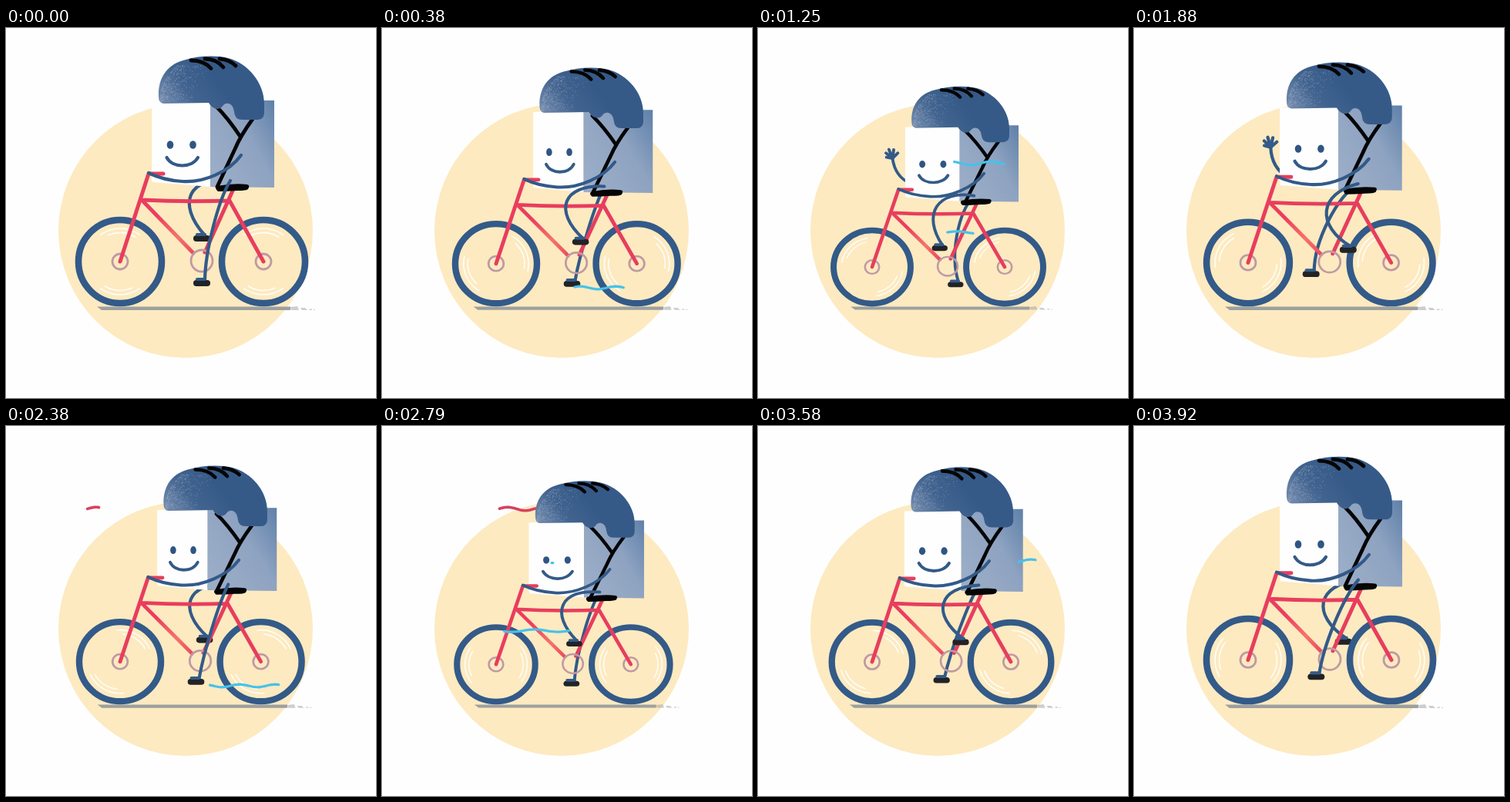
Write an HTML page that moves like this. It is 480x480 px and loops after 3.96 s.

```html
<!DOCTYPE html>
<html lang="en">
<head>
<meta charset="utf-8">
<title>Cycling cube</title>
<style>
  html, body { margin: 0; width: 100%; height: 100%; overflow: hidden; background: #fefefe; }
  svg { display: block; width: 100vw; height: 100vh; }
  .line { fill: none; stroke-linecap: round; stroke-linejoin: round; }
  .blue { stroke: #335a88; stroke-width: 4.2; }
  .red { stroke: #e83d5e; stroke-width: 5; }
  .black { stroke: #050506; stroke-width: 4.8; }
  .mauve { stroke: #bf9aa4; stroke-width: 2.8; }
  .glint { stroke: #fff; stroke-width: 1.6; opacity: .9; }
  .wind { stroke: #45c2ea; stroke-width: 3.2; }
</style>
</head>
<body>
<svg viewBox="0 0 480 480">
  <defs>
    <linearGradient id="side" x1="0" y1=".75" x2="1" y2="0">
      <stop offset="0" stop-color="#9badc7"/>
      <stop offset=".55" stop-color="#8ea3c1"/>
      <stop offset="1" stop-color="#5f80a9"/>
    </linearGradient>
    <linearGradient id="shell" x1="0" y1=".65" x2=".55" y2=".4">
      <stop offset="0" stop-color="#7189ac"/>
      <stop offset=".5" stop-color="#41638f"/>
      <stop offset="1" stop-color="#365a88"/>
    </linearGradient>
    <linearGradient id="tube" gradientUnits="userSpaceOnUse" x1="176" y1="223" x2="243" y2="292">
      <stop offset=".3" stop-color="#ec3d5f"/>
      <stop offset=".7" stop-color="#f5736a"/>
      <stop offset="1" stop-color="#ec4a60"/>
    </linearGradient>
    <g id="wheel">
      <circle r="54" class="line" stroke="#335a88" stroke-width="8.6"/>
      <circle r="10" class="line mauve"/>
    </g>
    <g id="foot">
      <rect x="-11" y="-4" width="22" height="8" rx="4" fill="#222326"/>
      <path class="line blue" d="M4-5H-6"/>
    </g>
    <path id="arc" class="line glint"/>
  </defs>

  <circle cx="233" cy="263" r="165" fill="#fdeac0"/>
  <path id="redWind" class="line" stroke="#d8415f" stroke-width="3.6"/>

  <g id="rig">
    <g fill="#9ca09f">
      <path d="M118 361.500H369V366H124Z"/>
      <path d="M369 362l9-1 2 5h-10zM382 363h6l3 3h-7zM393 364.500h4v1.500h-3zM399 365h2v1h-2z" opacity=".5"/>
    </g>
    <path id="farLeg" class="line blue"/>
    <use id="farFoot" href="#foot"/>
    <g id="wheels"></g>

    <g id="rider">
      <g id="wave">
        <path class="line blue" d="M4 6C-7-7-8-22-3-38"/>
        <path class="line blue" stroke-width="3.4" d="M-3-38L-10-43M-3-38L-8-49M-3-38L-2-52M-3-38L4-49M-3-38L7-42"/>
      </g>
      <path id="right" fill="url(#side)"/>
      <path id="front" fill="#fefefe"/>
      <g id="face">
        <g fill="#2f5583">
          <ellipse cx="213" cy="151.500" rx="4.300" ry="5.300"/>
          <ellipse cx="242.500" cy="151.500" rx="4.300" ry="5.300"/>
        </g>
        <path class="line blue" d="M208.500 168C216 182 241 182 249 168"/>
      </g>
      <path id="strap" class="line black" d="M273 102Q288 117 304 141M320 118Q304 140 297 157L274 206"/>
      <g id="helmet">
        <path fill="url(#shell)" d="M204 98Q198 97 198 89C197 66 208 48 230 42C249 36 271 35 288 39C315 46 335 72 335 98V111Q334 119 326 119H306Q297 119 296 109C295 98 287 95 282 100C278 107 269 107 263 97Z"/>
        <path id="grain" fill="#a9b9d0" opacity=".5"/>
        <path class="line black" stroke-width="4" d="M240 42Q257 42 266 52.500M258 40Q273 40 282 51M277 40Q290 41 298 49"/>
      </g>
    </g>

    <path class="line red" d="M204 189H185L148 303M176 223Q230 226 290 224L334 303M295 209L258 291"/>
    <path class="line" stroke="url(#tube)" stroke-width="5" d="M176 223L243 292"/>
    <circle cx="254" cy="302" r="14" class="line mauve"/>
    <path d="M274 205Q295 201 313 203Q317 204 314 209Q312 211 300 211Q286 212 275 212Q270 208 274 205Z" fill="#050506"/>
    <path class="line blue" d="M305 165C290 186 257 201 229 199C210 198 197 194 185 188"/>
    <path id="nearLeg" class="line blue"/>
    <use id="nearFoot" href="#foot"/>
  </g>
  <path id="windA" class="line wind"/>
  <path id="windB" class="line wind"/>
  <path id="windC" class="line wind"/>
</svg>
<script>
const $ = id => document.getElementById(id);
const put = (id, name, value) => $(id).setAttribute(name, value);
const clamp = v => Math.min(1, Math.max(0, v));
const smooth = v => { v = clamp(v); return v * v * (3 - 2 * v); };
const rad = deg => deg * Math.PI / 180;

const FPS = 24, LOOP = 3960;
const HIP = [291, 198], CRANK = [254, 302], LEG = 134.5;
const PEAKS = [1, .78, .33, .74];
// frame, glint angle in degrees
const SPIN = [[0, 90], [18, 315], [30, 495], [45, 692], [57, 960], [78, 1215], [94, 1435], [96, 1465]];

function arc(r, half, mid) {
  const p = a => `${(r * Math.cos(rad(a))).toFixed(2)} ${(r * Math.sin(rad(a))).toFixed(2)}`;
  return `M${p(mid - half)}A${r} ${r} 0 0 1 ${p(mid + half)}`;
}
put('arc', 'd', [0, 180].map(m => arc(43, 36, m) + arc(37.5, 28, m + 4)).join(''));
$('wheels').innerHTML = [148, 334].map(x =>
  `<g transform="translate(${x} 303)"><use href="#wheel"/><use class="spin" href="#arc"/></g>`).join('');
const spinners = document.querySelectorAll('.spin');

// Speckles thin out away from the helmet's left edge
let seed = 7;
const rnd = () => (seed = seed * 16807 % 2147483647) / 2147483647;
let dots = '';
for (let i = 0; i < 420; i++) {
  const y = 48 + rnd() * 47;
  const edge = 200 + Math.pow((95 - y) / 47, 2.4) * 22;
  dots += `M${(edge + rnd() * rnd() * 48).toFixed(1)} ${y.toFixed(1)}h.9v.9h-.9z`;
}
put('grain', 'd', dots);

// Height eases out of each squash; width settles sooner
function hop(f) {
  const up = f % 12 >= 6;
  const u = up ? (f % 12 - 6) / 6 : f % 12 / 6;
  const rise = power => up ? 1 - Math.pow(1 - u, power) : Math.pow(1 - u, 1.4);
  const beat = Math.floor((f + 6) / 12) % 4;
  return {
    tall: PEAKS[beat] * rise(2.3),
    wide: PEAKS[beat] * rise(5),
    turn: beat === 1 ? rise(5) : 0
  };
}

function spinAt(f) {
  const i = SPIN.findIndex(k => k[0] > f);
  const [a, x] = SPIN[i - 1], [b, y] = SPIN[i];
  return x + (y - x) * (f - a) / (b - a);
}

function leg(name, deg) {
  const x = CRANK[0] - 29 * Math.sin(rad(deg));
  const y = CRANK[1] + 29 * Math.cos(rad(deg));
  const ax = x + 4, ay = y - 4;
  const dx = ax - HIP[0], dy = ay - HIP[1], dist = Math.hypot(dx, dy);
  const bend = .47 * Math.sqrt(Math.max(0, LEG * LEG - dist * dist)) / dist;
  const knee = k => `${HIP[0] + dx * k - dy * bend} ${HIP[1] + dy * k + dx * bend}`;
  put(name + 'Leg', 'd', `M${HIP}C${knee(.22)} ${knee(.72)} ${ax} ${ay}`);
  put(name + 'Foot', 'transform', `translate(${x} ${y})`);
}

// A wavy line whose head and tail run along the same path
function wind(id, t, [x0, x1], y, { amp, length, crest }, head, tail) {
  const at = ([start, span]) => x0 + (x1 - x0) * smooth((t - start) / span);
  const a = at(tail), b = at(head);
  let d = '';
  if (b - a > .5) {
    for (let i = 0; i <= 24; i++) {
      const x = a + (b - a) * i / 24;
      d += `${i ? 'L' : 'M'}${x.toFixed(1)} ${(y - amp * Math.cos((x - crest) / length * 2 * Math.PI)).toFixed(1)}`;
    }
  }
  put(id, 'd', d);
}

function draw(f) {
  const { tall, wide, turn } = hop(f);
  const sx = .925 + .075 * wide, sy = .88 + .12 * tall;
  put('rig', 'transform', `translate(148 362) scale(${sx} ${sy}) translate(-148 -362)`);
  put('rider', 'transform', `translate(${5 * (1 - wide) / sx} 0)`);

  const left = 189 + 7 * turn, mid = 265 - 3 * turn, right = 348 + 6 * turn;
  put('front', 'd', `M${left} 97L${mid} 94V206L${left + 2} 200Q${left} 200 ${left} 197Z`);
  put('right', 'd', `M${mid} 94H${right}V207L${mid} 206Z`);
  put('face', 'transform', `translate(${228.5 + 2.5 * turn} 0) scale(${1 - .1 * turn} 1) translate(-228.5 0)`);
  put('strap', 'transform', `translate(${turn} 0)`);
  put('helmet', 'transform', `translate(${6.5 * turn} 0)`);

  const out = smooth((f - 9) / 6) * smooth((52 - f) / 9);
  const tilt = 30 + 10 * Math.cos((f - 18) / 18 * 2 * Math.PI);
  put('wave', 'visibility', out > 0 ? 'visible' : 'hidden');
  put('wave', 'transform', `translate(190 176) rotate(${-tilt}) translate(0 ${70 * (1 - out)})`);

  const pedal = -18.75 * f;
  leg('near', pedal);
  leg('far', pedal + 180);
  spinners.forEach(s => s.setAttribute('transform', `rotate(${-spinAt(f)})`));

  const ms = f * 1000 / FPS, t = ms < 2050 ? ms : ms - 1900;
  wind('redWind', t, [105, 212], 107.5, { amp: 2.2, length: 46, crest: 163 }, [355, 500], [430, 1000]);
  wind('windA', t, [220, 360], 175.5, { amp: 2.3, length: 52, crest: 302 }, [850, 620], [950, 925]);
  wind('windB', t, [125, 279], 265.5, { amp: 1.6, length: 60, crest: 258 }, [550, 500], [620, 900]);
  wind('windC', t, [250, 381], 337, { amp: 1.8, length: 46, crest: 303 }, [150, 460], [380, 460]);
}

function tick() {
  const t = performance.now() % LOOP;
  draw(Math.min(94, Math.floor(t * FPS / 1000 + .05)));
  requestAnimationFrame(tick);
}
tick();
</script>
</body>
</html>
```
